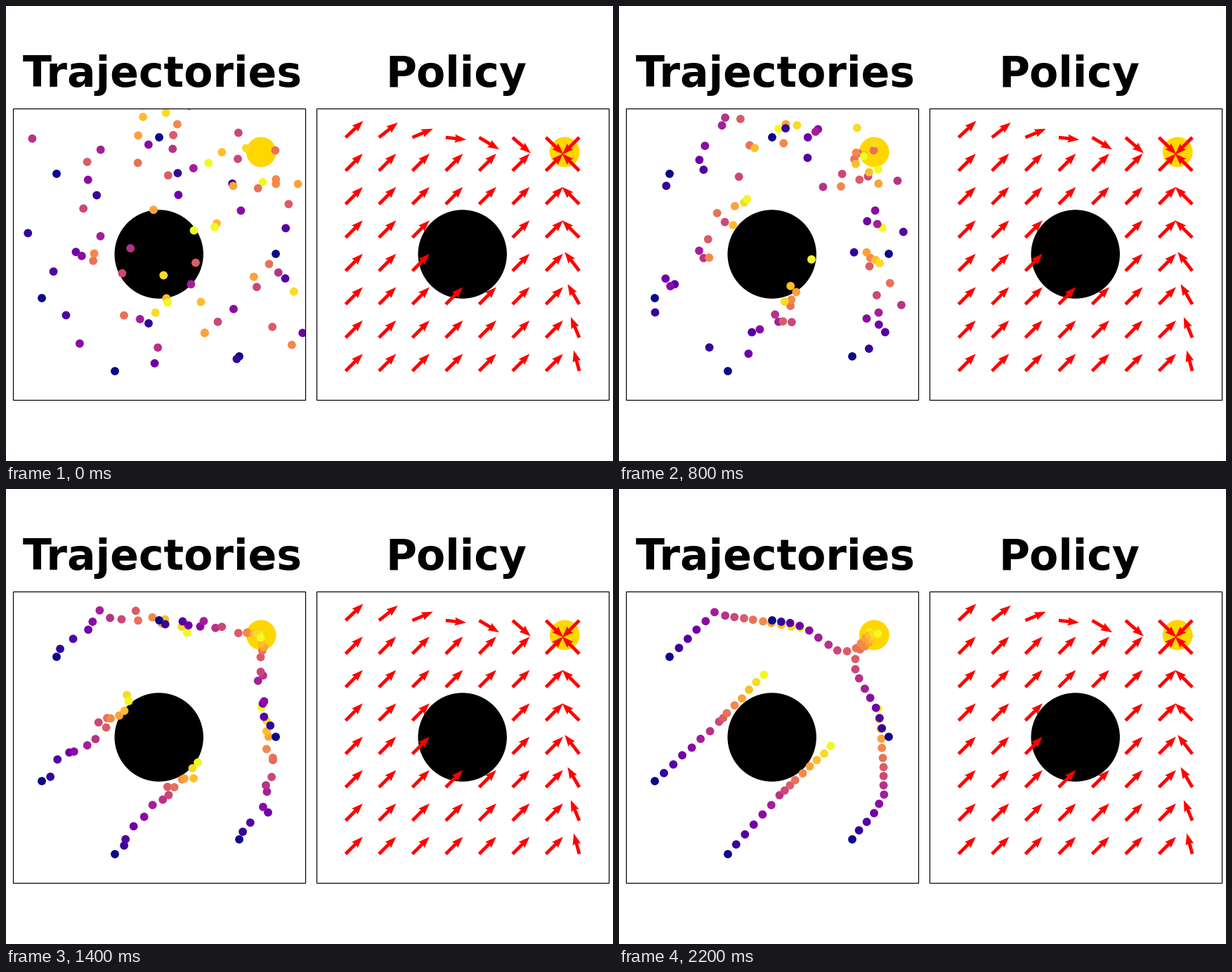
A matplotlib script that plays this animation: 864x648 px, repeating every 3300 ms.

```python
import numpy as np
import matplotlib.pyplot as plt
from matplotlib.animation import FuncAnimation
from matplotlib.patches import Circle, Rectangle

W, H = 864, 648
LEFT, RIGHT, MID_Y, HALF = 217.7, 649.7, 353.5, 207.9
FRAMES, STEP_MS = 33, 100
HOLD, STEPS, POINTS = 4, 18, 15
K = np.arange(POINTS)

# Key points of each path: (point index, x, y)
PATHS = {
    "nw": [(0, 72, 239), (5, 136, 175), (6, 151, 180), (14, 258, 198)],
    "w": [(0, 51, 416), (7, 143, 332), (9, 154, 320), (14, 206, 264)],
    "s": [(0, 155, 520), (6, 228, 436), (9, 251, 415), (14, 302, 366)],
    "se": [(0, 332, 499), (3, 363, 461), (5, 377, 435), (9, 376, 383),
           (14, 369, 313)],
    "e": [(0, 384, 353), (1, 374, 341), (4, 366, 298), (9, 368, 229),
          (14, 358, 204)],
    "n": [(0, 218, 187), (2, 244, 190), (9, 338, 203), (14, 368, 206)],
}
BLOCKED = ("w", "s")                    # slowed down by the obstacle
SAG = {"e": (-32, 0), "n": (0, 31)}     # bend inwards at the end


def make_noise():
    """Unit noise per step, partly carried over from the step before."""
    rng = np.random.default_rng(12)
    fresh = rng.standard_normal((STEPS + 1, len(PATHS), POINTS, 2)).clip(-1.9, 1.9)
    out = [fresh[0]]
    for f in fresh[1:]:
        out.append(0.6 * out[-1] + 0.8 * f)
    out = np.array(out)
    out[:, :, 0] = 0
    return out


noise = make_noise()


def clean_path(name, step):
    k, x, y = np.array(PATHS[name], float).T
    lag = 4 * np.sqrt(1 - step / STEPS) if name in BLOCKED else 0
    i = K - lag * (K / K[-1]) ** 2
    pts = np.column_stack([np.interp(i, k, x), np.interp(i, k, y)])
    bump = np.exp(-((K - 7.5) / 3) ** 2) * np.clip((step - 14) / 4, 0, 1)
    return pts + np.outer(bump, SAG.get(name, (0, 0)))


def positions(step):
    sigma = 58 * 0.76 ** step + 1.8 * (1 - step / STEPS)
    pts = np.array([clean_path(name, step) for name in PATHS])
    return (pts + sigma * noise[step]).reshape(-1, 2)


fig = plt.figure(figsize=(W / 72, H / 72), dpi=72, facecolor="white")
ax = fig.add_axes([0, 0, 1, 1])
ax.set(xlim=(0, W), ylim=(H, 0))
ax.axis("off")


def panel(cx, title, x):
    ax.add_patch(Circle((cx, MID_Y), 0.304 * HALF, color="black", lw=0, zorder=1))
    ax.add_patch(Circle((cx + 0.7 * HALF, MID_Y - 0.7 * HALF), 0.103 * HALF,
                        color="gold", lw=0, zorder=1))
    box = Rectangle((cx - HALF, MID_Y - HALF), 2 * HALF, 2 * HALF,
                    fill=False, ec="black", lw=1.2, zorder=5)
    ax.add_patch(box)
    ax.text(x, 115.5, title, fontsize=60, fontweight="bold",
            family="DejaVu Sans", va="baseline")
    return box


def draw_policy():
    n = np.arange(8)
    side = np.linspace(-0.8, 0.8, 8) * HALF
    gx, gy = np.meshgrid(side, side)
    angle = np.full((8, 8), 45.0)
    angle[0] = 45 * np.tanh(0.7 * (2.8 - n))
    angle[:, 7] = 135 - 7.5 * np.maximum(n - 3, 0)
    angle[0, 7] = -135
    a = np.radians(angle)
    size = 29 * (1 + 0.19 * np.sin(2 * a) ** 2)
    u, v = size * np.cos(a), -size * np.sin(a)
    free = np.hypot(gx, gy) > 0.3 * HALF
    ax.quiver(gx[free] + RIGHT, gy[free] + MID_Y, u[free], v[free],
              color="red", angles="xy", units="xy", scale_units="xy", scale=1,
              width=4.8, headwidth=2.5, headlength=3.4, headaxislength=3.1,
              zorder=3)


frame = panel(LEFT, "Trajectories", 23.3)
panel(RIGHT, "Policy", 540.7)
draw_policy()

colors = np.tile(K / K[-1], len(PATHS))
dots = ax.scatter(*positions(0).T, c=colors, cmap="plasma", s=11.8 ** 2,
                  linewidths=0, zorder=3)
dots.set_clip_path(frame)


def update(i):
    dots.set_offsets(positions(int(np.clip(i - HOLD, 0, STEPS))))
    return [dots]


anim = FuncAnimation(fig, update, frames=FRAMES, interval=STEP_MS,
                     repeat=True, repeat_delay=0, blit=False)
plt.show()
```
